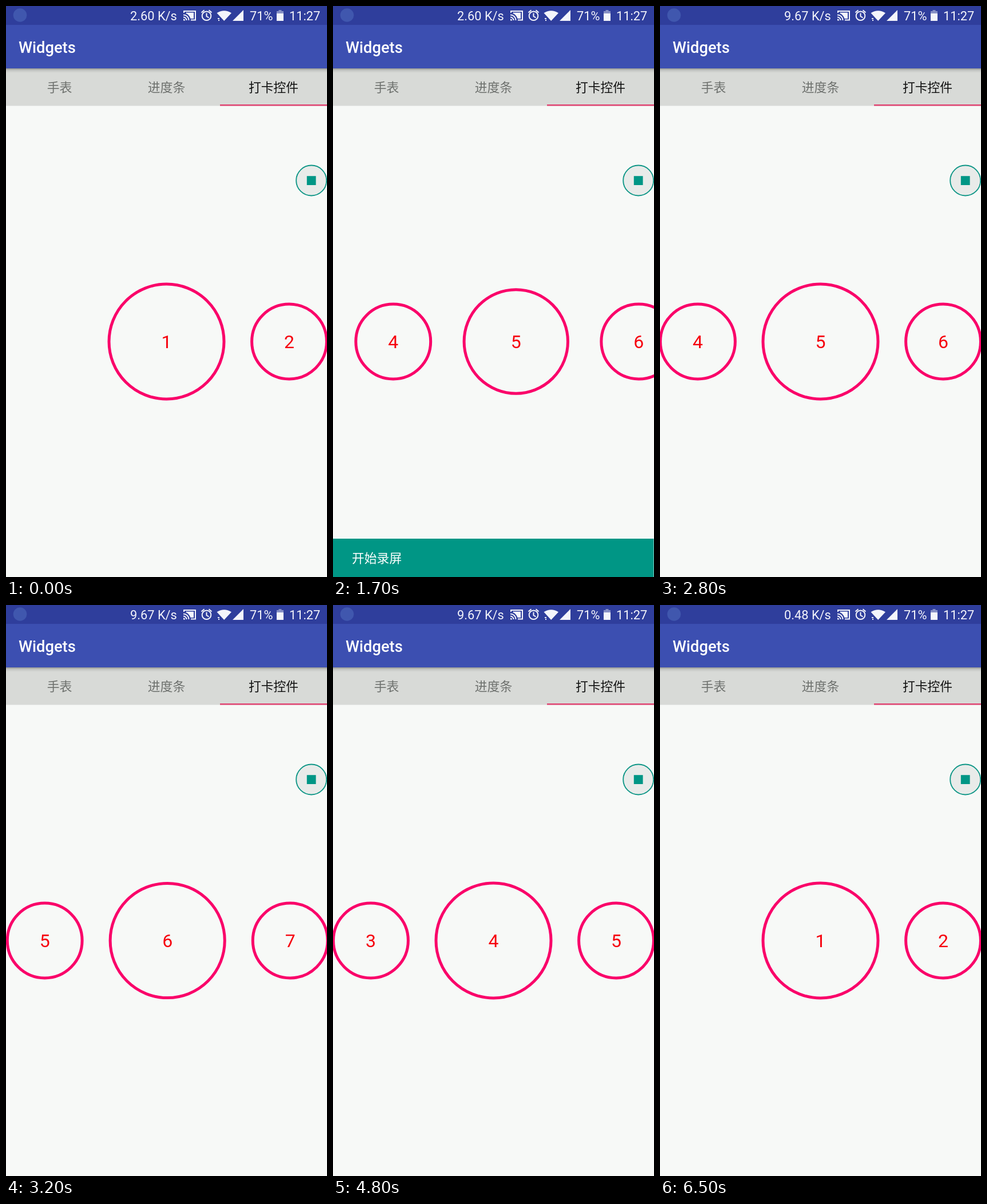
These frames come from a looping animation (561x998 px, 6600 ms). An HTML page:

```html
<!DOCTYPE html>
<html lang="zh">
<head>
<meta charset="utf-8">
<title>Widgets</title>
<style>
  html, body { margin: 0; width: 100%; height: 100%; overflow: hidden; background: #f7f9f7; }
  svg { display: block; width: 100%; height: 100%; }
  text { font-family: Roboto, "Noto Sans CJK SC", "Noto Sans CJK", sans-serif; font-size: 21.8px; }
  .status { fill: #f4f5fb; }
  .line { fill: none; stroke: #f4f5fb; stroke-width: 2; }
  .mid { text-anchor: middle; }
  .tab { fill: #6d706d; }
  .dial circle { fill: none; stroke: #fa0069; stroke-width: 5; }
  .dial text { fill: #f6000c; font-size: 32px; }
</style>
</head>
<body>
<svg viewBox="0 0 561 998">
  <defs>
    <linearGradient id="shade" x2="0" y2="1">
      <stop stop-color="#000" stop-opacity=".32"/>
      <stop offset=".4" stop-color="#000" stop-opacity=".1"/>
      <stop offset="1" stop-color="#000" stop-opacity="0"/>
    </linearGradient>
  </defs>
  <rect width="561" height="998" fill="#f7f9f7"/>

  <g id="dials"></g>

  <!-- tabs and app bar -->
  <rect y="109" width="561" height="65.5" fill="#d8dad7"/>
  <rect x="374" y="172" width="187" height="2.6" fill="#e04874"/>
  <rect y="109" width="561" height="8" fill="url(#shade)"/>
  <text class="mid tab" x="93.5" y="150">手表</text>
  <text class="mid tab" x="280.5" y="150">进度条</text>
  <text class="mid" x="467.5" y="150" fill="#111">打卡控件</text>
  <rect y="32" width="561" height="77" fill="#3c4fb1"/>
  <text x="22" y="81.5" fill="#fff" style="font-size:27.3px;font-weight:500">Widgets</text>

  <!-- status bar -->
  <rect width="561" height="33" fill="#2f3e9c"/>
  <circle cx="24.5" cy="16" r="11.8" fill="#4057ae"/>
  <text class="status" id="speed" x="217" y="25"></text>
  <path class="line" d="M311 12V9H331V24.5H323M310 15.5A9.5 9.5 0 0 1 319.5 25M310 19.5A5.5 5.5 0 0 1 315.5 25"/>
  <path class="status" d="M314.5 11.5H328V22H322.5Q320 15 314.5 13ZM310 22.5A3 3 0 0 1 313 25.5H310Z"/>
  <circle class="line" cx="350.5" cy="17.3" r="7.8"/>
  <path class="line" d="M350.5 12.5V18L354.5 20.5M341.5 11.5L346.5 7.3M354.5 7.3L359.5 11.5"/>
  <path class="status" d="M368.5 12.3Q381.2 4 394 12.3L381.2 26ZM396 26L415 7V26ZM370 21H373V23H370ZM371 24H373V26H371Z"/>
  <text class="status" x="426" y="25">71%</text>
  <path class="status" d="M476.5 7H481.5V9H485V13H473V9H476.5Z" opacity=".45"/>
  <path class="status" d="M473 13H485V26H473Z"/>
  <text class="status" x="495" y="25">11:27</text>

  <g id="snackbar">
    <rect y="931" width="560.5" height="67" fill="#009685"/>
    <text x="33" y="973" fill="#fff">开始录屏</text>
  </g>

  <!-- recorder button -->
  <circle cx="533.7" cy="305" r="26.5" fill="#e8ebe9" stroke="#0d9686" stroke-width="1.8"/>
  <rect x="525.8" y="297.2" width="15.8" height="15.8" fill="#009685"/>
</svg>
<script>
const LOOP = 6600, TICK = 100;
const CENTER = 280.5, PITCH = 214.5, DIALS = 7;
const byId = id => document.getElementById(id);

// Each swipe: start time, end time, pages moved.
const swipes = [[1150, 1860, 4], [2850, 3250, 1], [3550, 3967, -2], [5100, 5736, -3]];

const progress = (t, from, to) => Math.min(1, Math.max(0, (t - from) / (to - from)));
const easeInOut = u => u < .5 ? 4 * u ** 3 : 1 - 4 * (1 - u) ** 3;
const easeOut = u => 1 - (1 - u) ** 3;

byId('dials').innerHTML = Array.from({ length: DIALS }, (_, i) =>
  `<g class="dial"><circle cy="586.5"/><text class="mid" y="597.8">${i + 1}</text></g>`).join('');
const dials = [...byId('dials').children];

function draw(t) {
  const page = swipes.reduce((sum, [from, to, pages]) =>
    sum + pages * easeInOut(progress(t, from, to)), 0);
  dials.forEach((dial, i) => {
    const offset = (i - page) * PITCH;
    const [ring, label] = dial.children;
    ring.setAttribute('cx', CENTER + offset);
    ring.setAttribute('r', Math.max(65.4, 100.5 - Math.abs(offset) / 4));
    label.setAttribute('x', CENTER + offset);
  });

  const shown = easeOut(progress(t, 250, 500)) - easeInOut(progress(t, 2000, 2250));
  byId('snackbar').setAttribute('transform', `translate(0 ${(1 - shown) * 67})`);
  byId('speed').textContent = (t < 2400 ? '2.60' : t < 5400 ? '9.67' : '0.48') + ' K/s';
}

const start = performance.now();
function frame() {
  const t = (performance.now() - start) % LOOP;
  draw(Math.floor(t / TICK) * TICK);
  requestAnimationFrame(frame);
}
frame();
</script>
</body>
</html>
```
